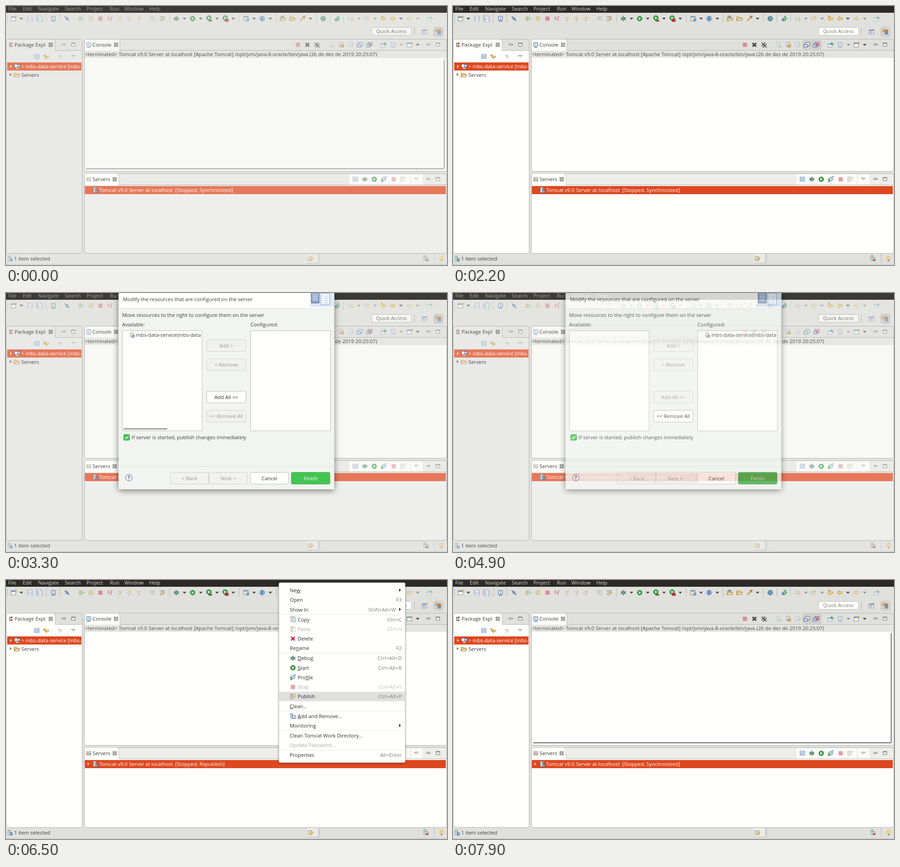
These frames come from a looping animation (976x574 px, 8000 ms). An HTML page:

```html
<!DOCTYPE html>
<html lang="en">
<head>
<meta charset="utf-8">
<title>Publishing to a server</title>
<style>
html, body { margin: 0; width: 100%; height: 100%; overflow: hidden; background: #e1e1de; }
#stage { display: block; width: 100vw; height: 100vh; font: 11.3px "Open Sans", "Noto Sans", sans-serif; }
text { white-space: pre; }
.key { text-decoration: underline; }
.shadow { filter: drop-shadow(0 1px 2px rgba(0,0,0,.4)); }
.deep { filter: drop-shadow(0 3px 7px rgba(0,0,0,.5)); }
.layer { animation: 8s -20ms infinite step-end; }

@keyframes idle {
  0% { opacity: 1 } 12.5% { opacity: 0 }
  28.75% { opacity: 0; animation-timing-function: linear } 31.25% { opacity: 1 }
  62.5% { opacity: 1; animation-timing-function: linear } 65%, 100% { opacity: 0 }
}
@keyframes synced { 0% { opacity: 1 } 62.5% { opacity: 0 } 93.75%, 100% { opacity: 1 } }
@keyframes stale { 0% { opacity: 0 } 62.5% { opacity: 1 } 93.75%, 100% { opacity: 0 } }
@keyframes expander { 0% { opacity: 0 } 62.5%, 100% { opacity: 1 } }
@keyframes scrollbars {
  0% { opacity: .55 } 2.5% { opacity: .25 } 3.75% { opacity: 0 }
  91.25% { opacity: .15; animation-timing-function: linear } 98.5%, 100% { opacity: 1 }
}
@keyframes menuA { 0% { opacity: 0 } 12.5% { opacity: 1 } 26.25%, 100% { opacity: 0 } }
@keyframes menuB { 0% { opacity: 0 } 75% { opacity: 1 } 86.25%, 100% { opacity: 0 } }
@keyframes hoverA {
  0% { opacity: 0; transform: none }
  16.25% { opacity: 1; transform: translateY(365px) }
  17.5% { opacity: 1; transform: translateY(321.75px) }
  18.75% { opacity: 1; transform: translateY(299.75px) }
  20%, 100% { opacity: 1; transform: translateY(278.5px) }
}
@keyframes hoverB {
  0% { opacity: 0; transform: none }
  80% { opacity: 1; transform: translateY(278.5px) }
  81.25%, 100% { opacity: 1; transform: translateY(235.25px) }
}
@keyframes dialog {
  0% { opacity: 0 } 30% { opacity: 0; animation-timing-function: linear }
  31.25% { opacity: 1 } 61.25% { opacity: 1; animation-timing-function: linear }
  62.5%, 100% { opacity: 0 }
}
@keyframes before { 0% { opacity: 1 } 48.75%, 100% { opacity: 0 } }
@keyframes picked { 0% { opacity: 0 } 42.5% { opacity: 1 } 48.75%, 100% { opacity: 0 } }
@keyframes moved { 0% { opacity: 0 } 48.75%, 100% { opacity: 1 } }
@keyframes listBar { 0% { opacity: 1 } 42.5% { opacity: 1; animation-timing-function: linear } 45%, 100% { opacity: 0 } }
@keyframes press { 0% { opacity: 0 } 58.75%, 100% { opacity: 1 } }
</style>
</head>
<body>
<svg id="stage" viewBox="0 0 976 574" preserveAspectRatio="none"></svg>
<script>
const INK = '#3b3b39', ORANGE = '#dd4820', NAVY = '#2d5590', GREEN = '#3f9b46', GOLD = '#d3a037';

const R = (x, y, w, h, fill, stroke = 'none', r = 0) =>
  `<rect x="${x}" y="${y}" width="${w}" height="${h}" rx="${r}" fill="${fill}" stroke="${stroke}"/>`;
const P = (d, stroke, fill = 'none', w = 1.2) =>
  `<path d="${d}" stroke="${stroke}" fill="${fill}" stroke-width="${w}"/>`;
const C = (x, y, r, fill, stroke = 'none') =>
  `<circle cx="${x}" cy="${y}" r="${r}" fill="${fill}" stroke="${stroke}"/>`;
const T = (x, y, s, fill = INK, anchor = 'start') =>
  `<text x="${x}" y="${y}" fill="${fill}" text-anchor="${anchor}">${
    s.replace(/</g, '&lt;').replace(/_(.)/g, '<tspan class="key">$1</tspan>')}</text>`;
const at = (x, y, body, opacity = 1) => `<g transform="translate(${x} ${y})" opacity="${opacity}">${body}</g>`;
const clip = (x, y, w, h, body) =>
  `<svg x="${x}" y="${y}" width="${w}" height="${h}" viewBox="${x} ${y} ${w} ${h}">${body}</svg>`;
const layer = (name, body) => `<g class="layer" style="animation-name:${name}">${body}</g>`;

const page = R(-3.5, -5.5, 8, 10, '#fdfdf8', '#8797ad') + P('M-1.5-3H3M-1.5-.5H3M-1.5 2H3', '#86a5cf', 'none', 1);
const screen = R(-4.5, -5, 9, 8, '#fff', NAVY, 1) + P('M-2.5-2.5H2.5M-2.5 0H2.5', '#5d87bf', 'none', 1) + P('M-4 5.5H4', NAVY);
const disk = R(-5.5, -5.5, 11, 11, '#a9bfe0', '#5f82b8', 1) + R(-3, -5, 6, 4, '#fff') + R(-2.5, 1.5, 5, 4, '#fff');
const ball = C(0, 0, 5.3, '#38a342', '#277a32') + P('M-1.8-3 3 0-1.8 3Z', 'none', '#fff');
const hop = C(0, 4, 1.4, '#55606e') + P('M-5 1Q-3-5 3-2M3-5V0H-1', '#d8a22c', 'none', 1.5);
const folder = P('M-6 4V-4H-2L-1-2.5H4V0', '#a5803a', '#f7dc91') + P('M-6 4.5-3 0H6.5L4 4.5Z', '#a5803a', '#fbe9b7');
const back = P('M-6 0-1-4.5V-2H5V2H-1V4.5Z', '#b88a20', '#f8dc7a', 1);
const server = R(-4.5, -6, 5.5, 11, '#dfe8ee', '#8693a0') + P('M-3-3.5H0M-3-1H0', GREEN) + R(0, 0, 5, 5.5, '#7fa6d9', '#4b6fa5');
const cross = (c, w) => P('M-4-4 4 4M4-4-4 4', c, 'none', w);

const icons = {
  new: R(-5.5, -4, 10, 9, '#fdfdf5', '#77869a') + R(-5.5, -4.5, 10, 2.5, '#5c86c4') + P('M4.5-7V-1M1.5-4H7.5', GOLD, 'none', 1.5),
  save: disk,
  saves: at(-1.5, -1.5, disk) + at(1.5, 1.5, disk),
  screen,
  skip: P('M-5-5 5 5', NAVY, 'none', 1.5) + C(0, 0, 2.4, '#8db2dd', NAVY),
  resume: R(-6, -4, 2.5, 8, '#e7c44b', '#b9962b') + P('M-2-4.5 6 0-2 4.5Z', '#4c9a51', '#a7d9a0'),
  pause: R(-4, -4.5, 3, 9, '#f1d568', '#b9962b') + R(1, -4.5, 3, 9, '#f1d568', '#b9962b'),
  stop: R(-4, -4, 8, 8, '#dc3958', '#b92844'),
  cut: P('M-4 4V-4L3 4V-4M2-4 6-5', '#bd3444', 'none', 1.5),
  hop,
  back,
  forth: `<g transform="scale(-1 1)">${back}</g>`,
  home: back + C(-3, -5, 1.7, '#d47e27'),
  down: P('M-5-5V5M-2-4V4', '#8899b0') + P('M3-5V4M0 1 3 5 6 1', GOLD, 'none', 1.6),
  up: P('M-5-5V5M-2-4V4', '#8899b0') + P('M3 5V-4M0-1 3-5 6-1', GOLD, 'none', 1.6),
  filter: P('M-6-4H4M-6-1H4M-6 2H1', '#4f73a6') + P('M2 5 6 2', GOLD, 'none', 2),
  steps: P('M-6-4H5M-6 4H2', '#51657f') + P('M-5 0H4M1-3 5 0 1 3', GOLD, 'none', 1.5),
  bug: P('M-5.5-3 5.5 3M-5.5 3 5.5-3M0-6V6M-6 0H6', '#2f5238', 'none', 1) + C(0, 0, 3.2, '#79b88a', '#255b3a'),
  run: ball,
  cover: at(-1, -1.5, ball) + R(-2, 3, 4, 3.5, '#2f8c3a') + R(2, 3, 4, 3.5, '#c9252d'),
  tools: at(-1, -1.5, ball) + R(-1, 1.5, 7, 5, '#d3323b', '#9f222b'),
  web: R(-6, -5, 10, 10, '#f3ead2', '#8a8470') + R(-6, -5, 10, 2.5, '#6d97cf') + C(3, 3, 3, '#7fb7df', '#3f78aa'),
  service: C(0, 0, 5.5, '#a8c9ec', '#4a7cb5') + P('M2.5-3Q-3-4-2-1T2 1T-3 3', NAVY, 'none', 1.5),
  open: folder + C(-1, -4, 2.4, '#8fa6d2', '#4f6799'),
  folder,
  torch: P('M-4.5 5 2-2', '#caa24a', 'none', 3) + P('M1-5 5-1 6-6Z', '#a35b36', '#ee9d67'),
  globe: C(0, 0, 5.3, '#5b8fc4', '#315d8d') + P('M-3-3Q1-5 0-1T-3 3M2-3Q5 0 2 4', '#73b770', 'none', 2),
  link: P('M-5 4H2M-5 1H0', NAVY, 'none', 2) + P('M-2-1 3-6V-1H6L1 5', GREEN, '#8ecba4'),
  pin: R(-6, -2, 9, 7, '#f7fafc', '#7b93b1') + R(-6, -3, 9, 2.5, '#7ea4d7') + P('M0 0 3-3M1-5 6 0', '#2f9a5b', 'none', 2),
  persp: R(-5, -4, 10, 9, '#fff', '#788aa1') + R(-5, -4, 10, 2, '#5c86c4') + P('M-1-2V5M-5 1H5', '#788aa1') + P('M4-7V-2M1.5-4.5H6.5', GOLD),
  java: R(-6, -5, 5, 5, '#e8c687', '#a06c2b') + C(2.5, -1.5, 3, '#c58953', '#8a572b') + R(-1, 2, 6, 3.5, '#86a6d3', '#4f709d'),
  collapse: R(-5, -5, 10, 9, '#fff', '#6c8fbd') + R(-3, -2.5, 8, 7, '#eaf2fc', '#6c8fbd') + P('M-1 1H3', NAVY),
  sync: P('M-2 2H5V-2M2 5-2 2 2-1', '#b88a20', '#f8dc7a') + P('M2-2H-5M-2-5-6-2-2 1', '#b88a20', '#f8dc7a'),
  dots: C(-2, -2, 2.4, '#a2a2b8') + C(2, 0, 2.4, '#a8b8a6') + C(-1, 3, 1.8, '#b7a0a0'),
  view: P('M-4-2.5H4L0 1.5Z', '#73736f', '#fff', 1),
  drop: P('M-4-2H4L0 2.5Z', 'none', '#4a4a47'),
  min: R(-3.5, -2, 7, 2.5, '#fff', '#656562'),
  max: R(-4, -4, 8, 7, '#fff', '#656562') + P('M-4-3H4', '#656562'),
  sep: `<path d="M0-9V9" stroke="#8f8f8b" stroke-width="1.3" stroke-dasharray="1.5 2"/>`,
  bar: P('M0-12V12', '#deded9'),
  close: cross('#4b4b48', 3.2),
  closes: at(-1, -1, cross('#555552', 2)) + at(2, 2, cross('#555552', 2)),
  clear: page + at(4, 4, cross('#888', 1)),
  lock: page + R(0, 0, 6, 5, '#eab95c', '#a9752a'),
  wrap: page + P('M6-3V2H1', GOLD),
  out: R(-3, -5, 9, 7, '#fff', NAVY) + R(-6, -1, 8, 6, '#d4e4f8', NAVY),
  err: R(-3, -5, 9, 7, '#fff', NAVY) + R(-6, -1, 8, 6, '#d4e4f8', NAVY) + at(2, -1, cross('#d0213a', 1.2)),
  profile: P('M-5 6V-1L0 3Z', GREEN, '#6cba73') + C(1, -1, 4, '#eef4fc', '#4b6f9f') + P('M1-3V-1H3M4-5 6-7', NAVY),
  publish: R(-5.5, -5, 5, 10, '#e4e3da', '#85847b') + P('M-4-2H-2M-4 1H-2', GREEN) + R(1, -5, 4.5, 5, '#fdf3d2', '#a99968') + P('M1 3H5', GOLD),
  copy: at(-1.5, -1, page) + at(1.5, 1, page),
  paste: R(-5, -5, 8, 10, '#e0c48d', '#9b7b3e') + R(-1, -1, 6, 7, '#fff', '#8797ad'),
  delete: cross('#d3213a', 3),
  modules: at(-1, 0, server) + R(-1, -1, 7, 6, '#d9e5f4', '#5077a9'),
  server,
  package: P('M-3-5V4H0M-3-1H0', NAVY) + R(-1, -5, 4.5, 4, '#b86b45') + R(-1, 1, 4.5, 4, '#b86b45'),
  project: R(-6, -5, 7, 7, '#fff', '#476ea5') + R(0, -4, 6, 5, '#d6e5f7', '#476ea5') + P('M-3 4H3', '#f0dd9a', 'none', 2.5),
  servers: P('M-3.5-5V5M0-5V5M3.5-5V5', '#55606b') + C(-3.5, 1, 1.6, '#d9574a') + C(0, -2, 1.6, '#e0b13d') + C(3.5, 2, 1.6, '#51a35a'),
  jobs: R(-5, -4, 8, 8, '#f6efcb', '#8b8054') + P('M-2 1H5V-2M1 4-2 1 1-2', GOLD),
  alarm: at(0, -1, server) + R(-1, -2, 6, 6, '#f2f2f2', '#69925d') + at(3, 3, `<g transform="scale(.5)">${cross('#d0213a', 3)}</g>`),
  bulb: C(0, -1.5, 4, '#ffd978', '#dba540') + R(-1.5, 2.5, 3, 3.5, '#8e8e88'),
  jar: R(-4, -5, 6, 10, '#fdf6e0', '#9c8a5a', 1) + C(2, 2.5, 3, '#8fc6cf', '#3f7e92')
};

// "name123!" places an icon at x = 123; "!" means disabled
const strip = (y, spec, idle) => spec.split(' ').map(item => {
  const [, name, x, off] = item.match(/([a-z]+)(\d+)(!?)/);
  return at(x, y, icons[name], (off ? .5 : 1) * (idle ? .62 : 1));
}).join('');

const closeTab = (x, y) => at(x, y, cross('#444441', 3.4) + cross('#fff', 1.1));
const panel = (x, y, w, h, tab, fill, head) => R(x + .5, y + .5, w - 1, h - 1, fill, '#aeaeaa', 5) +
  P(`M${tab - 6} ${y + .5}Q${tab} ${y + .5} ${tab} ${y + 7}V${y + 25.5}H${x + w - .5}V${y + 6}q0-5.5-5.5-5.5Z`, '#b4b4b0', head, 1);
const expander = (x, y, fill) => P(`M${x - 2} ${y - 3.5}v7l4-3.5Z`, 'none', fill);

function workbench(idle) {
  const c = idle
    ? { bar: '#3c3a37', barText: '#aaa69e', bg: '#e4e4e1', tree: '#e9e9e8', log: '#f8f9f5', list: '#eeefed', row: '#e6785a', field: '#f5f5f3', ink: '#454543' }
    : { bar: '#2b2a27', barText: '#dcd8d0', bg: '#e0e0dd', tree: '#fffffd', log: '#fffffd', list: '#fffffd', row: ORANGE, field: '#fff', ink: INK };
  const menus = { File: 5, Edit: 37, Navigate: 71, Search: 130, Project: 178, Run: 230, Window: 262, Help: 317 };
  return R(0, 0, 976, 574, c.bg) + R(0, 0, 976, 15, c.bar) +
    Object.entries(menus).map(([s, x]) => T(x, 10, s, c.barText)).join('') +
    strip(28, 'sep3 new17 drop34 save53! saves74! sep89 screen105 sep119 skip135 resume167! pause188! stop209! cut230! hop252! hop273! hop294! ' +
      'filter325! steps346 sep362 bug377 drop395 run413 drop431 cover450 drop467 tools486 drop503 sep516 web532 drop549 service567 drop585 ' +
      'sep598 open613 folder634 torch656 drop674 sep687 globe702 sep717 link733 sep747 down763! drop781! up798! drop817! home835 back856 ' +
      'drop874 forth893! drop911! pin938!', idle) +
    R(809, 47.5, 88.5, 17.5, c.field, '#b9b9b5', 3) + T(853, 60, 'Quick Access', '#777774', 'middle') +
    at(904, 57, icons.sep) + R(947, 47, 20, 20, '#d5d5d1', '#bdbdb9', 3) + strip(57, 'persp926 java957', idle) +

    panel(0, 73, 169, 476, 109, c.tree, c.bg) + strip(86, 'package11 min128 max149', idle) + T(19, 90, 'Package Expl', c.ink) + closeTab(99, 86) +
    strip(112, 'collapse68 sync89 dots120! view149', idle) +
    R(2.5, 125, 164.5, 18, c.row) + expander(11, 134, '#fbd5c8') + expander(10.5, 152, '#777') +
    strip(134, 'project25', 0) + strip(153, 'folder24', idle) +
    clip(20, 120, 147, 30, T(34, 138, '> mbs-data-service [mbs-data]', '#fff')) + T(34, 156.5, 'Servers', c.ink) +

    panel(173, 73, 803, 294, 252, c.log, c.bg) + R(174, 99, 801, 16, idle ? '#e6e6e3' : '#e5e5e2') +
    (idle ? '' : R(774, 76, 20, 20, '#d2d2ce', '#bebeba', 3) + R(795, 76, 20, 20, '#d2d2ce', '#bebeba', 3)) +
    strip(86, 'screen183 stop646! close667 closes688 clear720! lock741 wrap762! out783 err804 pin836 screen857! drop875! new893 drop911 min935 max956', idle) +
    T(191, 90, 'Console', c.ink) + closeTab(243.5, 86) +
    T(175, 111, '<terminated> Tomcat v9.0 Server at localhost [Apache Tomcat] /opt/jvm/java-8-oracle/bin/java (26 de dez de 2019 20:25:07)', '#4a4a48') +

    panel(173, 371, 803, 178, 250, c.list, idle ? '#ebebe8' : '#ededea') + P('M174 377q0-5.5 5.5-5.5H244Q249.500 371.500 249.500 378V397H174Z', 'none', '#fdfdfb') +
    R(760, 373, 162, 23, '#fafaf8') + strip(384, 'servers183 collapse773 bug794 run815 profile836 stop858! publish879! bar895 view908 min935 max956', idle) +
    T(191.5, 388, 'Servers', c.ink) + closeTab(240.5, 384) +
    R(174.5, 399, 799, 18, c.row) + strip(408, 'server198', 0) + T(206, 412, 'Tomcat v9.0 Server at localhost', '#fff') +

    strip(560, 'server9', idle) + T(18, 563.5, '1 item selected', c.ink) +
    R(666, 549.5, 25, 20, '#eaeae7') + P('M666 569.5H691.500V550', '#bdbdb9', 'none', 1) +
    strip(560, 'jobs674 sep694 alarm929 sep948 bulb964', idle) + P('M0 572.500H976', '#c9c9c5', 'none', 1);
}

const entries = [
  ['Ne_w', '>'], ['Open', 'F3'], ['Show In', 'Shift+Alt+W', , '>'], 0,
  ['Copy', 'Ctrl+C', 'copy'], ['Paste', 'Ctrl+V', 'paste', 'off'], ['Delete', '', 'delete'], ['Re_name', 'F2'], 0,
  ['_Debug', 'Ctrl+Alt+D', 'bug'], ['_Start', 'Ctrl+Alt+R', 'run'], ['Pro_file', '', 'profile'], ['Stop', 'Ctrl+Alt+S', 'stop', 'off'],
  ['Publish', 'Ctrl+Alt+P', 'publish'], ['_Clean...', ''], 0,
  ['_Add and Remove...', '', 'modules'], ['Monitorin_g', '>'], 0,
  ['Clean Tomcat Work Directory...', ''], ['Update Password...', '', , 'off'], 0, ['Properties', 'Alt+Enter']
];

function contextMenu(hover) {
  let y = 29;
  const rows = entries.map(entry => {
    if (!entry) { y += .75; return P(`M450 ${y - 11}H727`, '#e6e6e3', 'none', 1); }
    const [label, hint, icon, extra] = entry, off = extra === 'off', arrow = hint === '>' || extra === '>';
    const row = (icon ? at(480, y, icons[icon], off ? .5 : 1) : '') +
      T(icon ? 490.5 : 473, y + 4, label, off ? '#a9a9a6' : '#2f2f2d') +
      (hint === '>' ? '' : T(arrow ? 708 : 721, y + 4, hint, off ? '#bcbcb9' : '#7d7d7a', 'end')) +
      (arrow ? expander(717, y - .5, '#222') : '');
    y += 21.25;
    return row;
  }).join('');
  return `<g class="shadow">${R(449, 12, 279.5, 398.5, '#fffffd', '#cbcbc8', 3)}</g>` +
    layer(hover, R(449.5, 18.5, 278.5, 21, '#dfdfdd')) + rows;
}

function button(x, y, w, label, on) {
  const green = label === 'Finish';
  return R(x, y, w, 26, green ? '#43c552' : on ? '#fffffe' : '#f1f2f0', green ? '#36ab45' : on ? '#b9bab7' : '#cfd0cd', 3) +
    T(x + w / 2, y + 17, label, green ? '#fff' : on ? '#333' : '#979895', 'middle');
}

const moduleItem = (x, fill) => at(x + 22.5, 93, icons.jar) +
  clip(x, 84, 175, 20, T(x + 31, 97, 'mbs-data-service(mbs-data-service)', fill));

function dialogBox() {
  const actions = [['Add >', 103.5], ['< Remove', 146], ['Add All >>', 217.5], ['<< Remove All', 260]];
  const action = (i, on) => button(444, actions[i][1], 87, actions[i][0], on);
  const list = x => R(x, 83.5, 176.5, 222, '#fffffd', '#b9bab7');
  return `<g class="deep">${R(249, -40, 477.5, 475, '#f2f4f2')}</g>` +
    R(249, 0, 477.5, 34, '#fffffd') + P('M249 34.500H726', '#dcdedb', 'none', 1) +
    R(673, 0, 53, 31, '#dce8f6') + R(676, -4, 17, 26, '#8fa6c8', '#3d5478') +
    P('M678 3.500H691M678 7.500H691M678 11.500H691M678 15.500H691', '#dce7f5', 'none', 1.5) +
    R(697, 1, 19, 25, '#f8fbff', '#7f99bf') + P('M704 7H713M704 12H713M704 17H713M704 22H713M700 7h2M700 12h2M700 17h2M700 22h2', '#8eabd3') +
    T(259, 18, 'Modify the resources that are configured on the server') +
    T(257, 53, 'Move resources to the right to configure them on the server') +
    T(257, 73.5, 'Available:') + T(541, 73.5, 'Configured:') + list(257.5) + list(541.5) +
    actions.map((_, i) => action(i, false)).join('') +
    layer('before', moduleItem(257, INK) + action(2, true)) +
    layer('picked', R(258, 84, 175.5, 18, ORANGE) + moduleItem(257, '#fff') + action(0, true)) +
    layer('moved', moduleItem(541, INK) + action(3, true)) +
    layer('listBar', R(260, 300, 97, 2.5, '#8d8e8b', 'none', 1)) +
    R(260.5, 313.5, 13, 13, '#43c552', '#36ab45', 2) + P('M263.500 320 266 323 271 317', '#fff', 'none', 1.6) +
    T(278, 324, 'If server is started, publish changes immediately') +
    P('M249 384.500H726', '#dfe1de', 'none', 1) +
    C(272, 409, 7.3, '#f8f9fb', '#4b5877') + `<g font-weight="700">${T(272, 413, '?', '#35466c', 'middle')}</g>` +
    button(363.5, 397.5, 85, '< Back') + button(449.5, 397.5, 85, 'Next >') +
    button(540.5, 397.5, 85, 'Cancel', true) + button(631.5, 397.5, 85.5, 'Finish', true) +
    layer('press', R(631, 397, 86.5, 27, 'rgba(0,0,0,.12)', 'none', 3));
}

document.getElementById('stage').innerHTML =
  workbench(false) + layer('idle', workbench(true)) +
  layer('synced', T(374.5, 412, '[Stopped, Synchronized]', '#fff')) +
  layer('stale', T(374.5, 412, '[Stopped, Republish]', '#fff')) +
  layer('expander', expander(182.5, 407.5, '#fbc9b8')) +
  layer('scrollbars', R(968.7, 117.5, 2.3, 243, '#7b7e82', 'none', 1) + R(177, 359.6, 793, 2.4, '#7b7e82', 'none', 1)) +
  layer('menuA', contextMenu('hoverA')) +
  layer('menuB', at(155, -6, contextMenu('hoverB'))) +
  layer('dialog', dialogBox());
</script>
</body>
</html>
```
